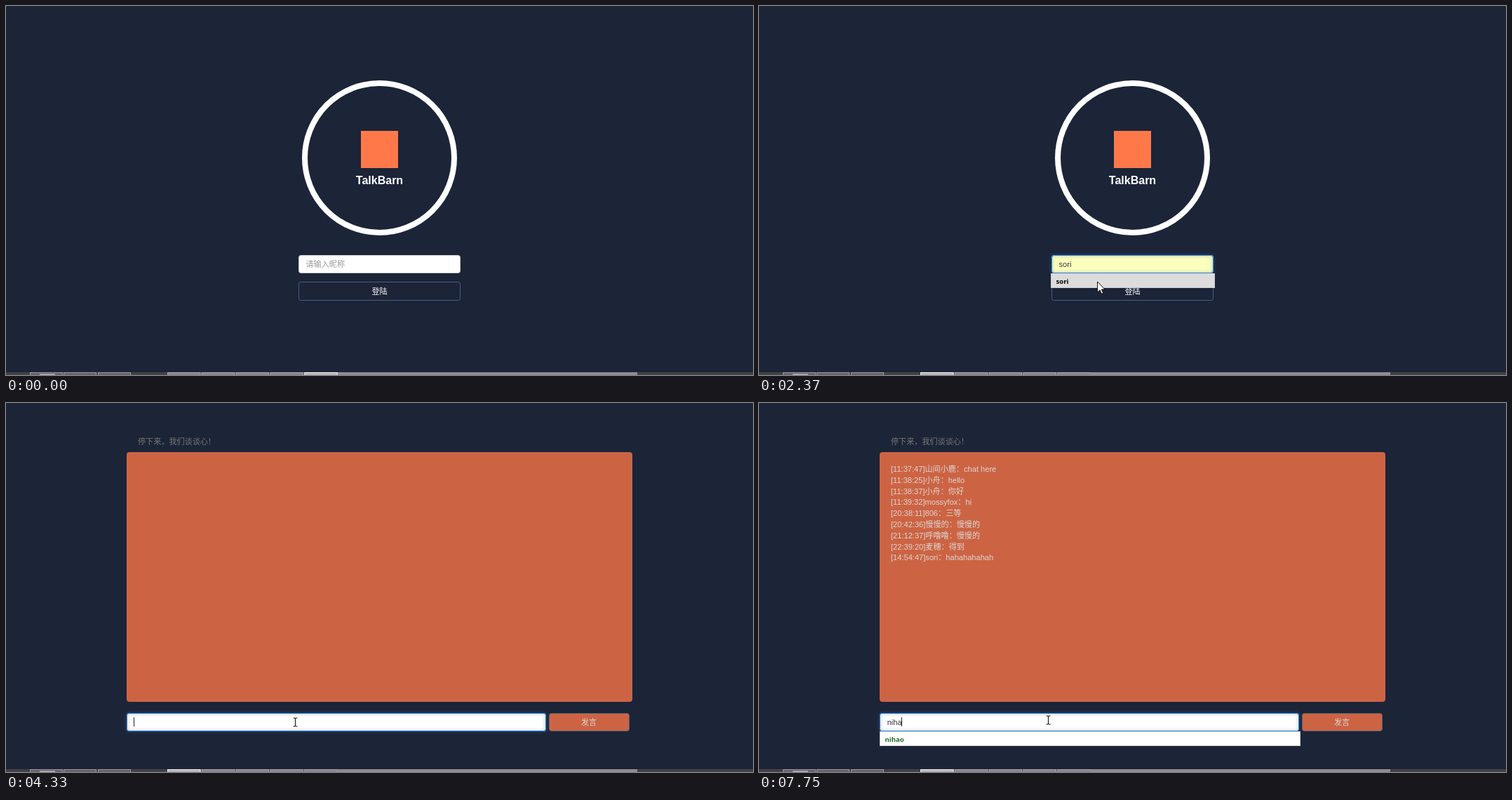
Write an HTML page that moves like this. It is 1065x526 px and loops after 8 s.

```html
<!DOCTYPE html>
<html lang="zh">
<head>
<meta charset="utf-8">
<title>Chat login</title>
<style>
html, body { margin: 0; width: 100%; height: 100%; overflow: hidden; background: #1c2438; }
svg { display: block; width: 1065px; height: 526px; }
text { font: 11.1px "Liberation Sans", "Noto Sans CJK SC", "Noto Sans CJK", sans-serif; white-space: pre; }
.mid { text-anchor: middle; }
.typed { fill: #3a3a3a; }
.hint { fill: #999; }
.brand { font-size: 16px; font-weight: bold; fill: #fff; }
.item { font: bold 9.6px "Noto Sans", "Noto Sans CJK SC", "Noto Sans CJK", sans-serif; }
.field { fill: #fff; stroke: #ccc; }
.glow { fill: none; stroke: #3f86cf; filter: drop-shadow(0 0 2px #3d7fd0); }
.list { fill: #fff; stroke: #d0d0d4; }
.caret { stroke: #222; }
.chat { fill: #dcd5d2; }
.tip { font-size: 9.4px; fill: #575757; }
.outline { fill: #fff; stroke: #111; }
[data-on] { display: none; }
</style>
</head>
<body>
<svg viewBox="0 0 1065 526">
  <rect width="1065" height="526" fill="#1c2438"/>

  <g data-on="0-3400">
    <circle cx="532.5" cy="216.5" r="106.5" fill="none" stroke="#fff" stroke-width="8"/>
    <rect x="506" y="178" width="53" height="53" fill="#ff7849"/>
    <text class="brand mid" x="532.5" y="254">TalkBarn</text>

    <rect class="field" x="417.5" y="355.5" width="230" height="25" rx="3"/>
    <rect data-on="2214-3400" x="417.5" y="355.5" width="230" height="25" rx="3" fill="#faffbd" stroke="#7b93ad"/>
    <rect class="glow" data-on="730-3250" data-fade="150" x="417.5" y="355.5" width="230" height="25" rx="3"/>
    <text class="hint" data-on="0-1340" x="427.5" y="372">请输入昵称</text>
    <text class="typed" data-on="1340-1750" x="427.5" y="372">s</text>
    <text class="typed" data-on="1750-2214" x="427.5" y="372">so</text>
    <text class="typed" data-on="2214-3400" x="427.5" y="372">sori</text>
    <path class="caret" data-on="750-1280" d="M427.5 362v12"/>
    <path class="caret" data-on="1340-1750" d="M433.5 362v12"/>
    <path class="caret" data-on="1750-2214" d="M439.5 362v12"/>
    <path class="caret" data-on="2598-3100" d="M445.5 362v12"/>

    <rect x="417.5" y="393.5" width="230" height="26" rx="3" fill="none" stroke="#45607c"/>
    <rect data-on="3175-3400" x="417" y="393.5" width="231" height="26.5" rx="2" fill="none" stroke="#3768b4" stroke-width="1.7"/>
    <text class="mid" x="532.5" y="411" fill="#fff">登陆</text>

    <g data-on="880-1280">
      <rect class="list" x="416.5" y="381.5" width="233" height="115"/>
      <g id="names"></g>
    </g>
    <g data-on="1280-2598">
      <rect class="list" x="416.5" y="381.5" width="233" height="20"/>
      <rect data-on="2214-2598" x="417" y="382" width="232" height="19" fill="#dcdcdc"/>
      <text class="item" x="423.5" y="395.5">sori</text>
    </g>
  </g>

  <g data-on="3400-8000">
    <text x="188" y="58.7" fill="#777">停下来，我们谈谈心！</text>
    <rect x="172" y="70" width="721" height="356" rx="4" fill="#cc6444"/>
    <g id="log" data-on="4490-8000"></g>

    <rect class="field" x="172.5" y="442.5" width="597" height="25" rx="3"/>
    <rect class="glow" data-on="4160-8300" data-fade="150" x="172.5" y="442.5" width="597" height="25" rx="3"/>
    <rect x="774.5" y="442.5" width="114" height="25" rx="3" fill="#cc6444" stroke="#566476"/>
    <text class="mid chat" x="831" y="459">发言</text>

    <text class="typed" data-on="7060-7300" x="182.7" y="459">n</text>
    <text class="typed" data-on="7300-7750" x="182.7" y="459">ni</text>
    <text class="typed" data-on="7750-8000" x="182.7" y="459">niha</text>
    <path class="caret" data-on="4240-4720 5290-5830 6360-6890" d="M182.5 448v13"/>
    <path class="caret" data-on="7060-7300" d="M189.5 448v13"/>
    <path class="caret" data-on="7300-7750" d="M191.5 448v13"/>
    <path class="caret" data-on="7750-8000" d="M203.5 448v13"/>

    <g data-on="7140-8000">
      <rect class="list" x="172.5" y="468.5" width="599" height="20"/>
      <text class="item" x="179.5" y="482.5" fill="#246a24">nihao</text>
    </g>
    <g data-on="4560-7000" data-fade="120">
      <rect x="411" y="462" width="76" height="17" fill="#000" opacity=".45"/>
      <rect x="409.5" y="460.5" width="76" height="17" fill="#fff" stroke="#767676"/>
      <text class="tip" x="414" y="472.5">请填写此字段。</text>
    </g>
  </g>

  <g id="bar"></g>

  <g id="cursor">
    <path id="arrow" class="outline" d="M0 0V15L3.5 11.8L5.8 17.3L8.2 16.3L5.9 11H10.6Z"/>
    <path id="beam" fill="none" stroke="#222" stroke-width="1.2" d="M-3-6H-1L0-5L1-6H3M0-5V5M-3 6H-1L0 5L1 6H3"/>
    <path id="hand" class="outline" d="M-1.5 11V1.3a1.4 1.4 0 0 1 2.8 0V6.5q2-1 2.8.4q2-.8 2.6.6q1.9-.4 1.9 1.5V13q0 2-1.2 3.4V18H.6V17Q-2 14.5-4.4 11.2Q-4 9.3-1.5 11ZM1.3 6.5V10M4.1 7V10M6.7 7.5V10"/>
  </g>
</svg>
<script>
const LOOP = 8000;
const $ = id => document.getElementById(id);
const clamp = v => Math.max(0, Math.min(1, v));

function add(parent, tag, attrs, text = '') {
  const el = document.createElementNS('http://www.w3.org/2000/svg', tag);
  for (const key in attrs) el.setAttribute(key, attrs[key]);
  el.textContent = text;
  parent.append(el);
  return el;
}

['sori', '山间小鹿', '小舟', 'mossyfox', '806', '慢慢的'].forEach((name, i) =>
  add($('names'), 'text', { class: 'item', x: 423.5, y: 395.5 + i * 19 }, name));

[
  '[11:37:47]山间小鹿：chat here',
  '[11:38:25]小舟：hello',
  '[11:38:37]小舟：你好',
  '[11:39:32]mossyfox：hi',
  '[20:38:11]806：三等',
  '[20:42:36]慢慢的：慢慢的',
  '[21:12:37]呼噜噜：慢慢的',
  '[22:39:20]麦穗：得到',
  '[14:54:47]sori：hahahahahah'
].forEach((line, i) => add($('log'), 'text', { class: 'chat', x: 188, y: 98 + i * 15.8 }, line));

// Sliver of the taskbar along the bottom edge
const bar = $('bar');
const strip = (x, w, fill, y = 522, h = 4) => add(bar, 'rect', { x, y, width: w, height: h, fill });
function tab(x, w, fill, edge) {
  strip(x, w, edge);
  strip(x + 1, w - 2, fill, 523, 3);
}
strip(0, 1065, '#434145');
strip(473, 427, '#908c93');
[34, 82, 131].forEach(x => tab(x, 47, '#676469', '#99969b'));
strip(48, 22, '#bbb8bd', 524.5, 1.5);
strip(230, 243, '#5d5a60');
for (let i = 0; i < 5; i++) tab(230 + i * 48.8, 47.5, '#89858c', '#a5a1a8');
const active = add(bar, 'g', {});
add(active, 'rect', { width: 47.5, height: 4, fill: '#eee' });
add(active, 'rect', { x: 1, y: 1, width: 45.5, height: 3, fill: '#b9b5bc' });

// start, end, tick, from x y, to x y
const moves = [
  [130, 655, 75, 760, 524, 479, 365],
  [1980, 2448, 78, 479, 365, 482, 393],
  [2520, 2988, 78, 482, 393, 490, 408],
  [3690, 4250, 80, 490, 408, 412, 455],
  [4410, 4490, 80, 412, 455, 412, 452]
];

function pointer(t) {
  const [start, end, tick, x0, y0, x1, y1] = moves.findLast(m => t >= m[0]) || moves[0];
  const k = clamp((Math.floor((t - start) / tick) + 1) * tick / (end - start));
  const e = k * k * (3 - 2 * k);
  return [x0 + (x1 - x0) * e, y0 + (y1 - y0) * e];
}

function shape(t, x, y) {
  if (t >= 3690) return y > 442 ? 'beam' : 'arrow';
  if (x > 417 && x < 648 && y > 355 && y < 381) return 'beam';
  return t >= 2520 && y > 393 ? 'hand' : 'arrow';
}

const timed = [...document.querySelectorAll('[data-on]')].map(el => ({
  el,
  fade: +el.dataset.fade || 0,
  spans: el.dataset.on.split(' ').map(s => s.split('-').map(Number))
}));

function draw(t) {
  for (const { el, fade, spans } of timed) {
    const span = spans.find(([a, b]) => t >= a && t < b);
    el.style.display = span ? 'inline' : 'none';
    if (span && fade) el.style.opacity = clamp((t - span[0]) / fade) * clamp((span[1] - t) / fade);
  }
  active.setAttribute('transform', `translate(${t < 130 ? 425.2 : 230} 522)`);
  const [x, y] = pointer(t);
  const kind = shape(t, x, y);
  $('cursor').style.display = t < 130 ? 'none' : 'inline';
  $('cursor').setAttribute('transform', `translate(${Math.round(x) + .5} ${Math.round(y)})`);
  for (const id of ['arrow', 'beam', 'hand']) $(id).style.display = id === kind ? 'inline' : 'none';
}

const begin = performance.now();
function tick() {
  draw((performance.now() - begin) % LOOP);
  requestAnimationFrame(tick);
}
tick();
</script>
</body>
</html>
```
